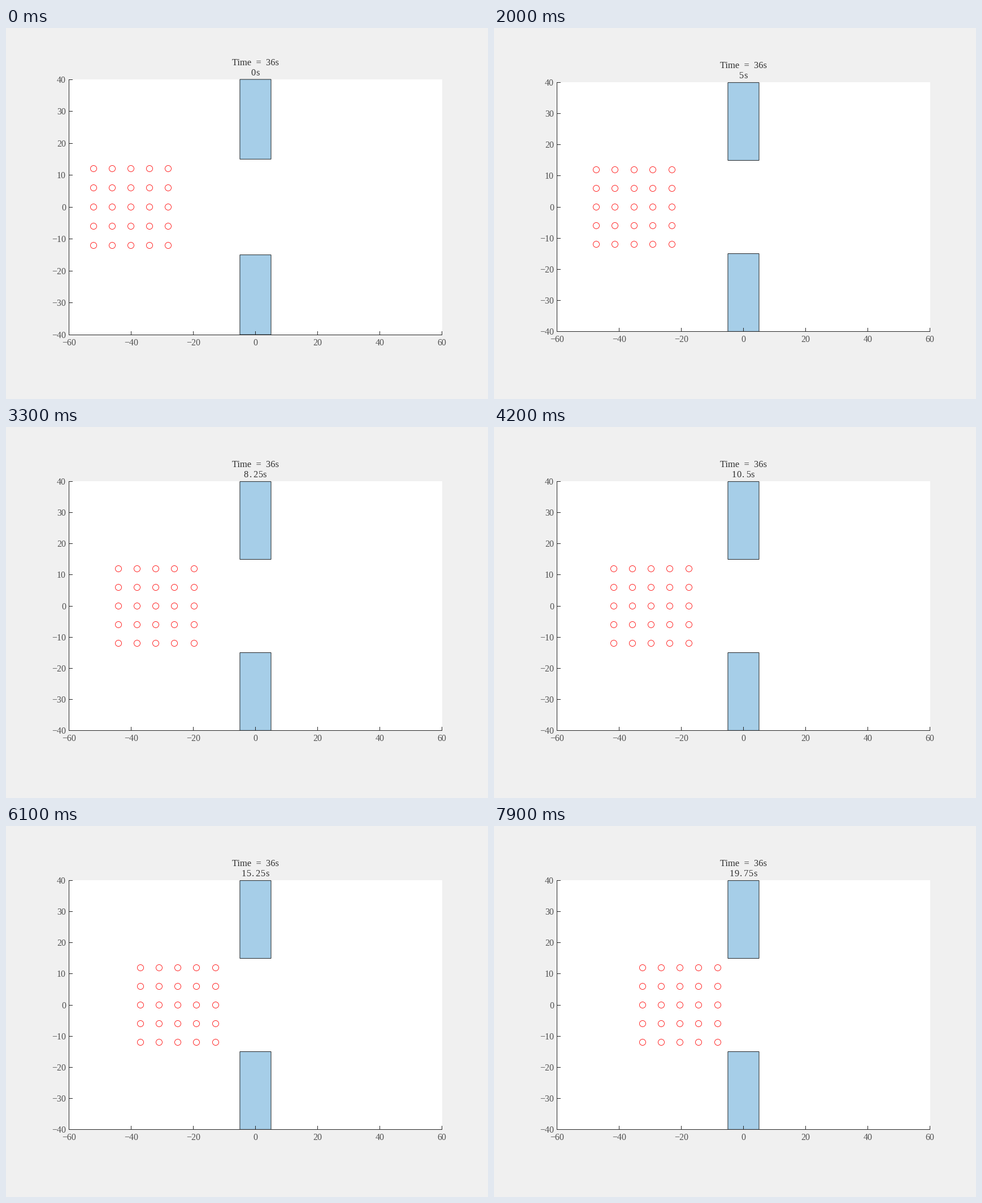
A matplotlib script for the animation above (8000 ms loop, 853x657 px).

```python
import numpy as np
import matplotlib.pyplot as plt
from matplotlib.animation import FuncAnimation
from matplotlib.patches import Circle, Rectangle

W, H, DPI = 853, 657, 64
FRAMES, STEP_MS, DT = 80, 100, 0.25
PT = 72 / DPI                     # points per pixel

LEFT, MID, SX = 111.0, 317.0, 5.508
AXIS, TICK_TEXT, TITLE_TEXT = "#262626", "#505050", "#303030"
WALL = "#a6cee8"
THIN = 0.83 * PT
LAG = 0.215                       # distance the followers lose while starting
PITCH = 8.25                      # digit advance of the title font

plt.rcParams["font.family"] = "Liberation Serif"
fig = plt.figure(figsize=(W / DPI, H / DPI), dpi=DPI, facecolor="#f0f0f0")
ax = fig.add_axes([0, 0, 1, 1])


def px(x):
    return LEFT + (x + 60) * SX


def pixel(v):
    """Centre of the pixel that holds v, for crisp one-pixel lines."""
    return np.floor(v) + 0.5


def line(xs, ys):
    ax.plot(xs, ys, color=AXIS, lw=PT, snap=False,
            solid_capstyle="projecting")


def label(x, y, s, ha="center", size=16, color=TICK_TEXT):
    ax.text(x, y, s, ha=ha, va="baseline", fontsize=size * PT, color=color)


def number(v):
    return str(v).replace("-", "\u2212")


def axes_frame(py):
    left, right = pixel(px(-60)), pixel(px(60))
    top, bottom = pixel(py(40)), pixel(py(-40))
    line([left, left], [top, bottom])
    line([left, right], [bottom, bottom])
    for v in range(-60, 61, 20):
        x = pixel(px(v))
        line([x, x], [bottom, bottom - 6])
        label(x, bottom + 18.5, number(v))
    for v in range(-40, 41, 10):
        y = pixel(py(v))
        line([left, left + 6], [y, y])
        label(106, y + 5.5, number(v), ha="right")


def box(x0, x1, y0, y1, **style):
    ax.add_patch(Rectangle((x0, y0), x1 - x0, y1 - y0, snap=False, **style))


def walls(py):
    for lo, hi in ((15, 40), (-40, -15)):
        box(px(-5), px(5), py(hi), py(lo),
            fc=WALL, ec="black", lw=THIN, joinstyle="miter")


def title(t, top):
    label(441.5, top - 25, "Time  =  36s", size=16.5, color=TITLE_TEXT)
    text = f"{t:g}s"
    for k, ch in enumerate(text):
        x = 441.5 + (k + 0.5 - len(text) / 2) * PITCH
        label(x, top - 7, ch, size=16.5, color=TITLE_TEXT)


def crowd(t, py):
    """Five by five markers, each centred on a whole pixel position."""
    lag = LAG * (1 - np.exp(-t / LAG))
    for col in range(5):
        x = -52 + 6 * col + t - (lag if col < 4 else 0)
        for y in range(-12, 13, 6):
            centre = np.round(px(x)), np.round(py(y))
            ax.add_patch(Circle(centre, 5.5, fill=False, ec="red", lw=THIN))


def draw(i):
    t = i * DT
    # The axes switch to equal scaling right after the first picture.
    sy = 5.65 if i == 0 else SX

    def py(y):
        return MID - y * sy

    ax.clear()
    ax.set_xlim(0, W)
    ax.set_ylim(H, 0)
    ax.axis("off")
    top = np.floor(py(40))
    box(111, 772, top, np.floor(py(-40)), fc="white", lw=0)
    walls(py)
    axes_frame(py)
    title(t, top)
    crowd(t, py)
    return []


anim = FuncAnimation(fig, draw, frames=FRAMES, init_func=lambda: [],
                     interval=STEP_MS, repeat=True, repeat_delay=0)
plt.show()
```
